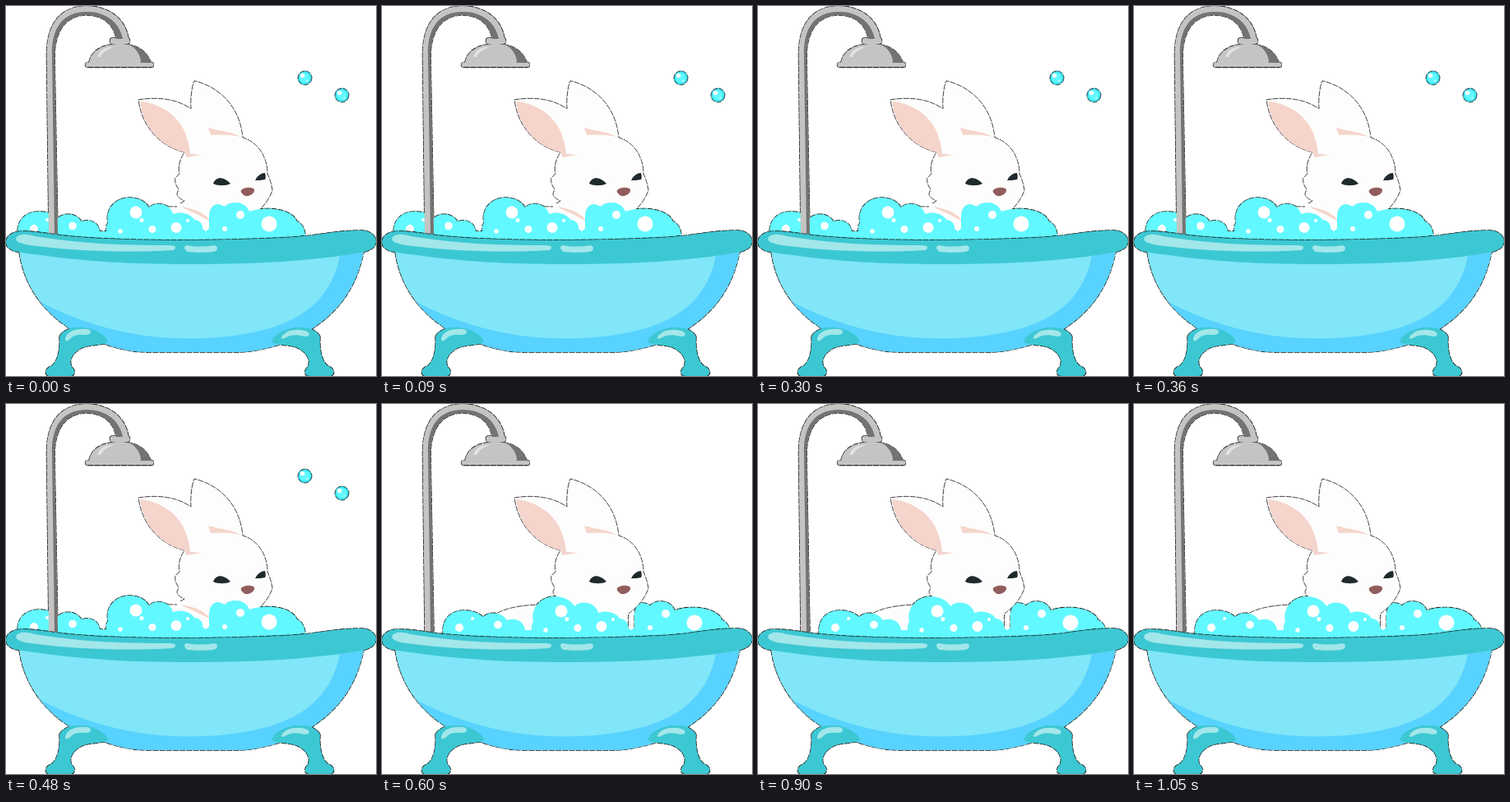
An HTML page that plays this animation: 450 px wide and 450 px high, repeating every 1080 ms.

```html
<!DOCTYPE html>
<html lang="en">
<head>
<meta charset="utf-8">
<title>Bunny bath</title>
<style>
html, body { margin: 0; width: 100%; height: 100%; overflow: hidden; background: #fff; }
svg { display: block; width: 100vw; height: 100vh; }
.line, .edge { stroke: #161616; stroke-linejoin: round; stroke-dasharray: 7 1.2; }
.line { stroke-width: .8; }
.edge { stroke-width: 1.5; }
.foam { fill: #62f8ff; }
.white { fill: #fdfdfd; }
.pink { fill: #f5d5cb; }
.teal { fill: #3cc8d3; }
.shine { fill: #a2e7ea; }
.dark { fill: #1f2a2c; }
.steel { fill: #c5c4c3; }
.shade { fill: #737373; }
</style>
</head>
<body>
<svg viewBox="0 0 450 450">
  <defs>
    <path id="suds" d="M14 290V275C14 258 26 250 40 250C50 250 58 253 63 258C70 251 85 251 92 262C104 258 113 265 114 274H122C122 268 122 266 124 264C120 245 135 233 150 233C162 233 170 238 174 245C182 237 200 240 203 253C213 249 226 253 229 260C236 260 240 266 239 271L243 274L247 271V262C246 248 250 242 257 241C261 241 264 243 266 244C272 237 291 236 296 250C314 243 348 246 354 262C360 264 364 272 364 280V290Z"/>
    <path id="bowl" d="M16 299C22 345 55 392 120 411C145 420 160 421 180 421H280C300 421 320 416 335 411C395 388 425 350 435 299Z"/>
    <clipPath id="inBowl"><use href="#bowl"/></clipPath>
    <path id="rim" d="M18 274C8 274 0 280 0 287C0 294 7 298 14 299C90 311 150 314 225 314S380 310 436 299C444 297 450 293 450 286C450 279 442 273 433 273C400 273 380 279 350 281C260 286 160 286 90 281C60 279 35 273 18 274Z"/>
    <path id="leg" d="M65 402C70 393 80 390 95 391C110 393 122 400 124 409C116 413 100 412 92 416C80 422 76 432 80 439C85 443 84 450 78 450H52C46 448 48 440 55 438C64 432 66 415 65 402Z"/>
    <g id="legs">
      <use href="#leg"/>
      <use href="#leg" transform="matrix(-1 0 0 1 447 0)"/>
    </g>
    <g id="shower">
      <path d="M52 277L49.500 60C49 20 68 0 98 0C125 0 146 16 149 40H134C131 22 118 11 98 11C75 11 60 27 59 60L63 277Z"/>
      <rect x="126.500" y="39" width="24" height="7" rx="3"/>
      <path d="M101 69C103 54 118 46 139 46C158 46 172 55 176 69Z"/>
      <rect x="96.500" y="68.500" width="83" height="6" rx="3"/>
    </g>
    <g id="bubble">
      <circle r="8.500" fill="#35e2f2" class="line"/>
      <circle r="6.200" fill="#62f8ff"/>
      <circle cx="-3" cy="-3" r="2.800" fill="#fff"/>
      <circle cx="3" cy="3.500" r="1.200" fill="#c8fcff"/>
    </g>
  </defs>

  <rect width="450" height="450" fill="#fff"/>
  <g id="bubbles">
    <use href="#bubble" x="363.500" y="87.500"/>
    <use href="#bubble" x="408.500" y="108.500"/>
  </g>

  <!-- outlines show only where they stick out from under the fills -->
  <g class="drift"><use href="#suds" class="foam edge"/></g>
  <use href="#shower" class="edge"/>

  <!-- rabbit -->
  <path class="white line" d="M130 290V262C142 248 172 243 208 244H306Q308 262 306 290Z"/>
  <path d="M299.500 255V272" fill="none" class="line"/>
  <path class="white" d="M208 240H307V256H208Z"/>
  <path class="white line" d="M212 240L217 237C212 235 208 232 208 228L210 223C206 218 205 212 206 209L211 204C209 196 211 187 217 178C185 170 165 145 161 114C185 110 208 113 225 125C224 112 226 98 229 91C255 97 284 118 288 160C305 165 318 182 318 204C321 210 323 217 324 224C320 236 312 246 300 255"/>
  <path class="pink" d="M163 116C183 118 200 127 211 142C219 153 223 168 224 180L238 181L220 184L217 178C187 170 167 148 163 116ZM246 148C258 152 273 152 285 159C272 156 260 156 249 157ZM212 244C226 246 241 250 249 262C238 256 225 250 212 244Z"/>
  <path class="dark" d="M252 216C255 207 265 207 273 216C268 219 257 219 252 216ZM303 212C306 206 311 203 315 203C316 206 316 210 315 211C311 212 307 212 303 212Z"/>
  <path fill="#925c5c" d="M286 224C290 220 299 220 302 223C303 228 296 232 291 231C287 229 285 226 286 224Z"/>

  <g class="drift">
    <use href="#suds" class="foam"/>
    <g id="dots" fill="#fff"></g>
  </g>

  <!-- shower -->
  <use href="#shower" class="steel"/>
  <path class="shade" d="M63 277L59 60C60 27 75 11 98 11C118 11 131 22 134 40H142C138 20 122 7 98 7C70 7 55 26 56 60L59 277Z"/>
  <path class="shade" d="M150 47C165 50 174 58 176 69H164C164 60 159 52 150 47Z"/>
  <path fill="#e4e2e1" d="M111 62C114 53 122 49 130 50C123 53 118 56 115 62Z"/>
  <path d="M99 74.500H177" class="line"/>

  <!-- tub -->
  <g class="edge">
    <use href="#bowl"/>
    <use href="#rim"/>
    <use href="#legs"/>
  </g>
  <use href="#bowl" fill="#80e6f8"/>
  <path clip-path="url(#inBowl)" fill="#58d2ff" d="M406 304C398 345 372 383 300 397C265 404 235 405 205 404C150 402 90 386 42 360V430H450V295Z"/>
  <use href="#rim" class="teal"/>
  <path class="shine" d="M13 281C10 285 15 289 30 291C90 299 150 300 203 297C208 295 207 291 200 291C140 291 90 289 35 280C25 277 17 277 13 281ZM220 291C230 293 243 293 253 291C259 292 258 298 252 299C242 300 230 300 221 299C216 297 216 291 220 291Z"/>
  <use href="#legs" class="teal"/>
  <path class="shine" d="M72 405C74 396 84 392 98 393C106 394 104 400 97 400C88 399 82 400 78 405C75 408 72 408 72 405ZM335 403C340 394 352 392 364 395C371 397 370 402 363 402C352 399 345 400 339 404C336 405 334 405 335 403Z"/>
</svg>
<script>
// x, y, radius of each fleck in the foam
const flecks = [
  [158, 251, 7.5], [207, 269.5, 6.5], [165, 260.5, 2.5], [178, 271.5, 4.5],
  [221, 261, 2], [139, 274, 2.7], [285, 254, 5], [320, 265, 9.5],
  [266, 271, 3], [34, 271, 5], [50, 260, 2], [81, 267.5, 4.8]
];
const dots = document.getElementById("dots");
for (const [cx, cy, r] of flecks) {
  const dot = document.createElementNS("http://www.w3.org/2000/svg", "circle");
  for (const [key, value] of Object.entries({ cx, cy, r })) dot.setAttribute(key, value);
  dots.append(dot);
}

// hold one pose for half the loop, then cut to the other
function swap(part, first, second) {
  const steps = [
    { offset: 0, ...first }, { offset: 0.5, ...first },
    { offset: 0.5, ...second }, { offset: 1, ...second }
  ];
  part.animate(steps, { duration: 1080, iterations: Infinity }).startTime = 0;
}
for (const foam of document.querySelectorAll(".drift")) {
  swap(foam, { transform: "translate(0px, 0px)" }, { transform: "translate(60px, 1px)" });
}
swap(document.getElementById("bubbles"), { opacity: 1 }, { opacity: 0 });
</script>
</body>
</html>
```
